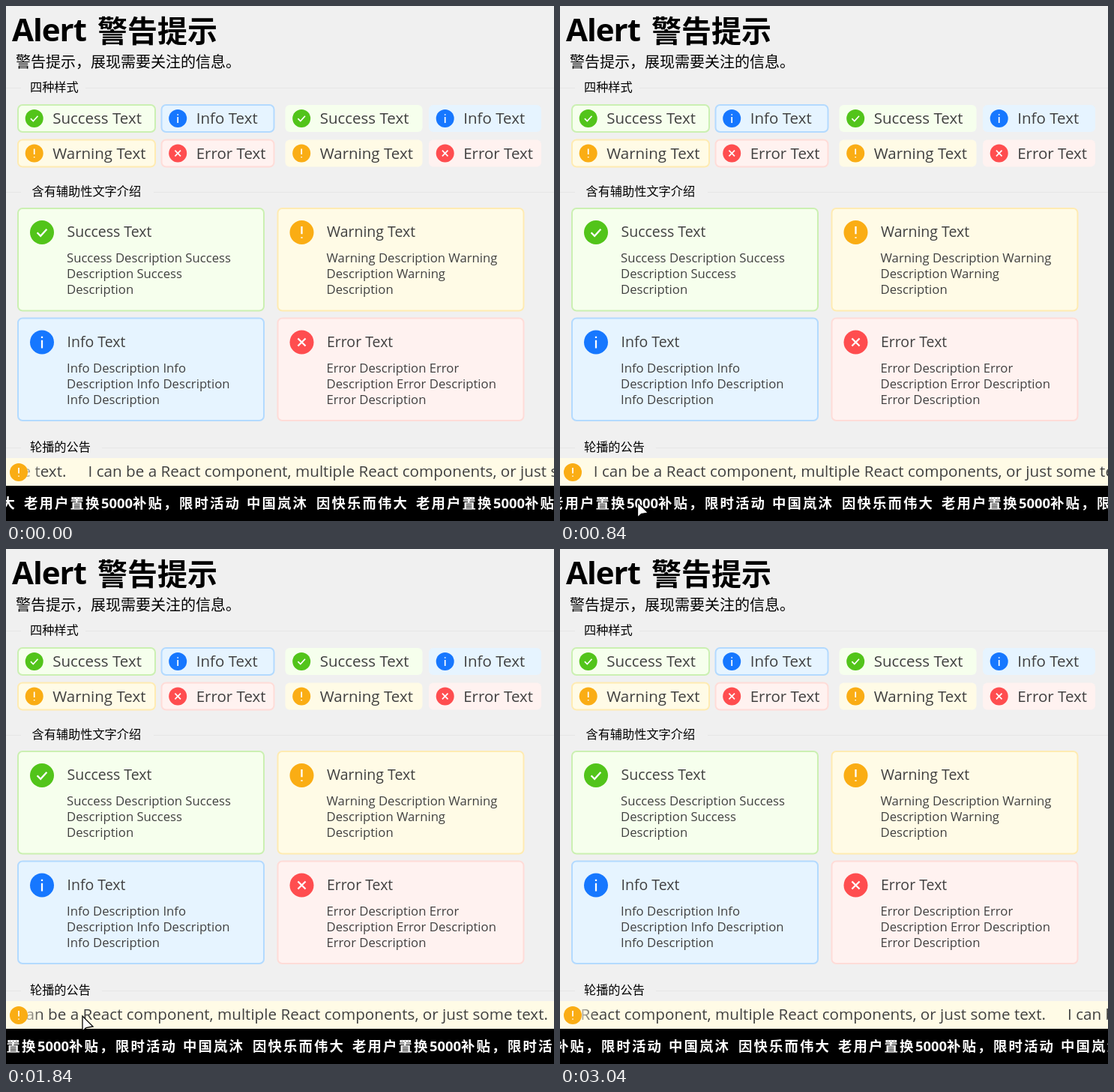
These frames come from a looping animation (731 by 687 pixels, 3120 ms). An HTML page:

```html
<!DOCTYPE html>
<html lang="zh-CN">
<head>
<meta charset="utf-8">
<title>Alert</title>
<style>
html, body { margin: 0; width: 100%; height: 100%; overflow: hidden; background: #f0f0f0; }
svg { display: block; }
text { font-family: "Open Sans", "Noto Sans CJK SC", "Noto Sans CJK", sans-serif; white-space: pre; }
.label { fill: #404040; font-size: 20.5px; }
.notice { fill: #404040; font-size: 20.65px; }
.title { fill: #404040; font-size: 19.5px; }
.desc { fill: #404040; font-size: 16.7px; }
.section { fill: #000; font-size: 16.2px; }
.bar { fill: #fff; font-size: 18.4px; font-weight: 700; }
.cjk { letter-spacing: 2.1px; }
</style>
</head>
<body>
<svg id="stage" width="731" height="687" viewBox="0 0 731 687">
  <defs>
    <linearGradient id="fade">
      <stop offset=".35" stop-color="#fffbe6"/>
      <stop offset="1" stop-color="#fffbe6" stop-opacity="0"/>
    </linearGradient>
  </defs>
</svg>
<script>
const stage = document.getElementById('stage');

const kinds = {
  Success: { main: '#52c41a', fill: '#f6ffed', edge: '#cbf0b2', mark: 'M-4.8 .2L-1.4 3.6L4.8 -3.2' },
  Warning: { main: '#faad14', fill: '#fffbe6', edge: '#ffebb2', mark: 'M0 -6V1.6M0 4.6V5.8' },
  Info: { main: '#1677ff', fill: '#e6f4ff', edge: '#b3daff', mark: 'M0 -5.8V-4.2M0 -2V6' },
  Error: { main: '#ff4d4f', fill: '#fff2f0', edge: '#ffdcd8', mark: 'M-3.8 -3.8L3.8 3.8M3.8 -3.8L-3.8 3.8' }
};

const text = (x, y, cls, s, extra = '') => `<text x="${x}" y="${y}" class="${cls}" ${extra}>${s}</text>`;

const box = (x, y, w, h, { fill, edge }, bordered = true) =>
  `<rect x="${x}" y="${y}" width="${w}" height="${h}" rx="6" fill="${fill}" stroke="${bordered ? edge : 'none'}" stroke-width="2"/>`;

const icon = (x, y, r, { main, mark }) =>
  `<g transform="translate(${x} ${y}) scale(${r / 12})"><circle r="12" fill="${main}"/>` +
  `<path d="${mark}" fill="none" stroke="#fff" stroke-width="1.7"/></g>`;

const pill = (x, y, w, name, bordered) =>
  box(x, y, w, 36, kinds[name], bordered) + icon(x + 21.7, y + 18, 12, kinds[name]) +
  text(x + 46.2, y + 25, 'label', name + ' Text');

function card(x, y, name, lines) {
  const body = lines.map((s, i) => text(x + 65, y + 72 + i * 21.2, 'desc', s)).join('');
  return box(x, y, 328, 136.5, kinds[name]) + icon(x + 32, y + 32, 16, kinds[name]) +
    text(x + 65.5, y + 38, 'title', name + ' Text') + body;
}

const section = (x, y, s, lineStart) =>
  `<path d="M0 ${y + 1.5}H20M${lineStart} ${y + 1.5}H731" stroke="#e6e6e6"/>` + text(x, y + 5.5, 'section', s);

const pills = (x, bordered) =>
  pill(x, 132, 183, 'Success', bordered) + pill(x + 191.5, 132, 150, 'Info', bordered) +
  pill(x, 178.5, 183, 'Warning', bordered) + pill(x + 191.5, 178.5, 150, 'Error', bordered);

const repeat = (period, s) =>
  [-1, 0, 1, 2].map(i => `<g transform="translate(${i * period})">${s}</g>`).join('');

const notice = text(-1.4, 628, 'notice', 'I can be a React component, multiple React components, or just some text.');
const promo = [
  [0, '老用户置换'], [103, '5000'], [145, '补贴，'],
  [207, '限时活动'], [297, '中国岚沐'], [390, '因快乐而伟大']
].map(([x, s]) => text(x, 669.5, s === '5000' ? 'bar' : 'bar cjk', s)).join('');

stage.innerHTML +=
  text(8, 46.5, '', 'Alert', 'font-size="42" font-weight="700" letter-spacing="-1"') +
  text(122, 48, '', '警告提示', 'font-size="40" font-weight="700"') +
  text(13, 81.5, '', '警告提示，展现需要关注的信息。', 'font-size="20"') +
  section(32, 108, '四种样式', 106) +
  pills(16, true) + pills(372.5, false) +
  section(34.5, 247, '含有辅助性文字介绍', 197) +
  card(16, 270, 'Success', ['Success Description Success', 'Description Success', 'Description']) +
  card(362.5, 270, 'Warning', ['Warning Description Warning', 'Description Warning', 'Description']) +
  card(16, 416.5, 'Info', ['Info Description Info', 'Description Info Description', 'Info Description']) +
  card(362.5, 416.5, 'Error', ['Error Description Error', 'Description Error Description', 'Error Description']) +
  section(32, 588, '轮播的公告', 128) +
  '<rect y="603" width="731" height="37" fill="#fffbe6"/>' +
  `<g id="notice">${repeat(746.5, notice)}</g>` +
  '<rect y="603" width="48" height="37" fill="url(#fade)"/>' + icon(17, 622, 12, kinds.Warning) +
  '<rect y="640" width="731" height="47"/>' +
  `<g id="promo">${repeat(523, promo)}</g>` +
  '<path id="cursor" d="M0 0V20L5 15.5L14 14Z" fill="#fff" stroke="#000" stroke-width="1.3"/>';

// Each ticker pauses while the pointer is over it.
const noticeX = [[0, 111], [560, 66], [1160, 16.5], [1280, 7], [2150, 7], [2360, -10], [2640, -37], [3040, -68], [3120, -74]];
const promoX = [[0, 24], [480, -14], [1250, -14], [1840, -61], [2130, -84], [2220, -84], [2360, -96], [2640, -120], [3040, -152], [3120, -158]];
const cursorX = [[480, 125], [560, 119], [900, 97], [1160, 97], [1290, 102], [2130, 102], [2220, 105]];
const cursorY = [[480, 690], [560, 684], [900, 653], [1160, 653], [1290, 623], [2130, 623], [2220, 690]];

function at(keys, t) {
  if (t <= keys[0][0]) return keys[0][1];
  const i = keys.findIndex(k => k[0] >= t);
  if (i < 0) return keys[keys.length - 1][1];
  const [t0, a] = keys[i - 1], [t1, b] = keys[i];
  return a + (b - a) * (t - t0) / (t1 - t0);
}

// The picture advances in 80 ms steps, with a few uneven holds.
function tick(t) {
  if (t >= 1160 && t < 1840) return Math.floor((t - 40) / 80) * 80 + 40;
  if (t >= 2320 && t < 2400) return t < 2360 ? 2240 : 2360;
  return Math.floor(t / 80) * 80;
}

const move = (id, x, y) => document.getElementById(id).setAttribute('transform', `translate(${x} ${y})`);
const start = performance.now();

function draw() {
  const t = tick((performance.now() - start) % 3120);
  move('notice', at(noticeX, t), 0);
  move('promo', at(promoX, t), 0);
  move('cursor', at(cursorX, t), at(cursorY, t));
  requestAnimationFrame(draw);
}
draw();
</script>
</body>
</html>
```
